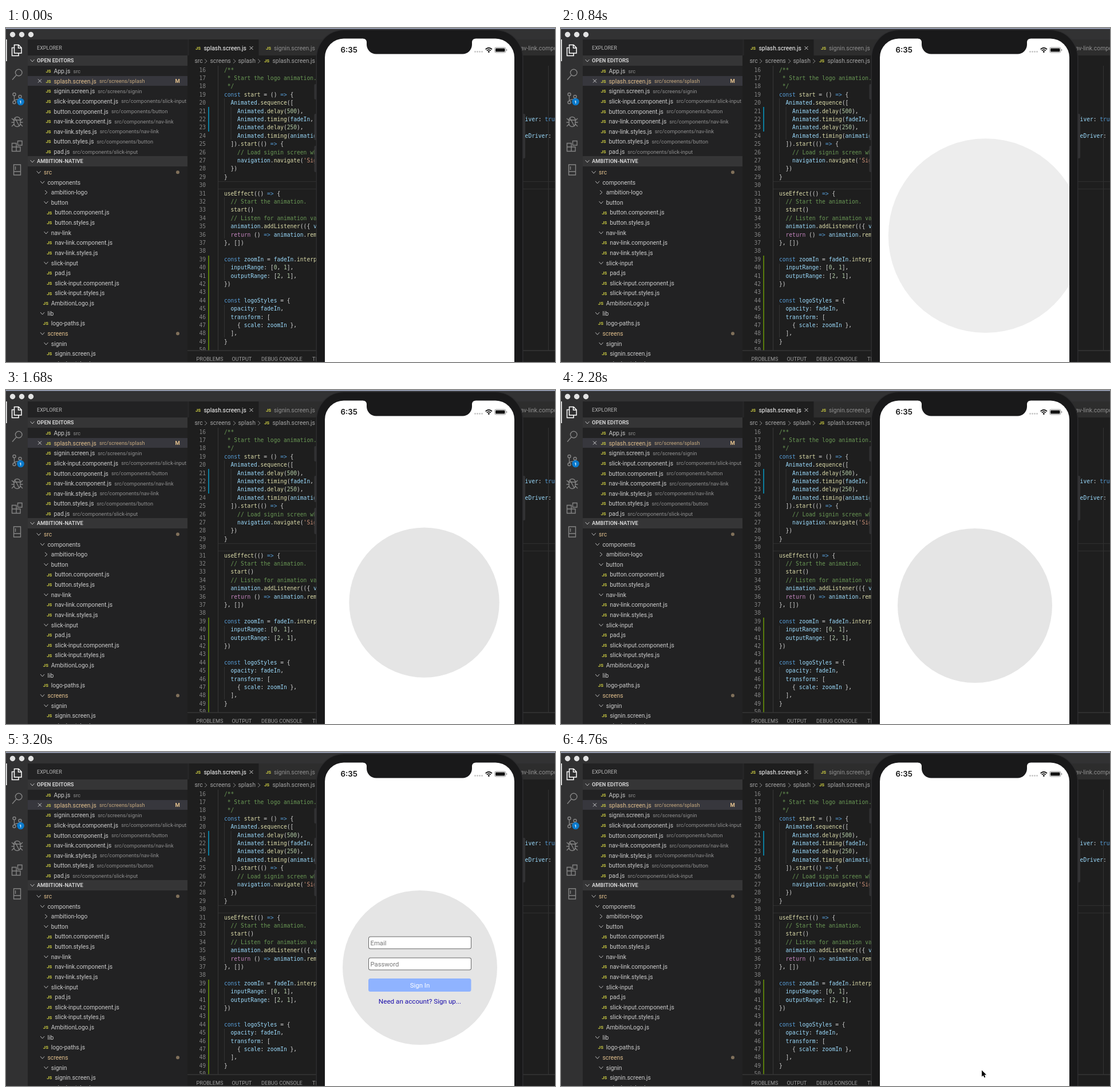
Recreate the animation shown at these times as an HTML page with a canvas. Size 959 px wide and 584 px high, loop 4800 ms.

```html
<!DOCTYPE html>
<html lang="en">
<head>
<meta charset="utf-8">
<style>
html, body { margin: 0; width: 100%; height: 100%; overflow: hidden; background: #1e1e1e; }
canvas { display: block; }
</style>
</head>
<body>
<canvas id="stage" width="959" height="584"></canvas>
<script>
const W = 959, H = 584, LOOP = 4800;
const stage = document.getElementById('stage').getContext('2d');
const desktop = document.createElement('canvas');
desktop.width = W;
desktop.height = H;
let g = desktop.getContext('2d');

const UI = 'Roboto, sans-serif', MONO = '"DejaVu Sans Mono", monospace';
const ORANGE = '#e2c08d', GREY = '#8f8f8f', BEZEL = '#19191a';

function rect(x, y, w, h, color) {
  g.fillStyle = color;
  g.fillRect(x, y, w, h);
}
function round(x, y, w, h, r, color) {
  g.fillStyle = color;
  g.beginPath();
  g.roundRect(x, y, w, h, r);
  g.fill();
}
function dot(x, y, r, color) {
  g.fillStyle = color;
  g.beginPath();
  g.arc(x, y, r, 0, 7);
  g.fill();
}
function line(path, color, width = 1) {
  g.strokeStyle = color;
  g.lineWidth = width;
  g.stroke(new Path2D(path));
}
// y is the middle of the capitals; returns where the text ends
function text(str, x, y, color, size = 10.35, weight = 400, family = UI, align = 'left') {
  g.font = `${weight} ${size}px ${family}`;
  g.fillStyle = color;
  g.textAlign = align;
  g.fillText(str, x, y + size * 0.36);
  return x + g.measureText(str).width;
}
const js = (x, y) => text('JS', x, y, '#cbcb41', 7.8, 700);
const cross = (x, y) => line(`M${x - 3} ${y - 3}l6 6m0-6l-6 6`, '#d0d0d0');
const chevron = (x, y, open, color = '#bbb') =>
  line(open ? `M${x - 3.5} ${y - 2}l3.5 4 3.5-4` : `M${x - 2} ${y - 3.5}l4 3.5-4 3.5`, color);

const openEditors = [
  'App.js src', 'splash.screen.js src/screens/splash', 'signin.screen.js src/screens/signin',
  'slick-input.component.js src/components/slick-input', 'button.component.js src/components/button',
  'nav-link.component.js src/components/nav-link', 'nav-link.styles.js src/components/nav-link',
  'button.styles.js src/components/button', 'pad.js src/components/slick-input'
];

// one leading space per level; + is an open folder, > a closed one
const tree = `+src
 +components
  >ambition-logo
  +button
   button.component.js
   button.styles.js
  +nav-link
   nav-link.component.js
   nav-link.styles.js
  +slick-input
   pad.js
   slick-input.component.js
   slick-input.styles.js
  AmbitionLogo.js
 +lib
  logo-paths.js
 +screens
  +signin
   signin.screen.js
   signin.styles.js`.split('\n');

const code = `/**
 * Start the logo animation.
 */
const start = () => {
  Animated.sequence([
    Animated.delay(500),
    Animated.timing(fadeIn, { toValue: 1, duration: 750, easing: Easing.linear, useNativeDriver: true }),
    Animated.delay(250),
    Animated.timing(animation, { toValue: 1, duration: 750, easing: Easing.linear, useNativeDriver: true })
  ]).start(() => {
    // Load signin screen when done.
    navigation.navigate('SignIn')
  })
}

useEffect(() => {
  // Start the animation.
  start()
  // Listen for animation values.
  animation.addListener(({ value }) => {})
  return () => animation.removeAllListeners()
}, [])

const zoomIn = fadeIn.interpolate({
  inputRange: [0, 1],
  outputRange: [2, 1],
})

const logoStyles = {
  opacity: fadeIn,
  transform: [
    { scale: zoomIn },
  ],
}
`.split('\n');

const TOKEN = /^ ?\/?\*.*|\/\/.*|'[^']*'|=>|\w+|\s+|[^\w\s]/g;
function tokenColor(token, rest) {
  if (/^( ?\/?\*|\/\/)/.test(token)) return '#6a9955';
  if (token[0] === "'") return '#ce9178';
  if (/^(const|=>|true)$/.test(token)) return '#569cd6';
  if (token === 'return') return '#c586c0';
  if (/^\d/.test(token)) return '#b5cea8';
  if (token === 'start' || (/^\w/.test(token) && rest[0] === '(')) return '#dcdcaa';
  return /^\w/.test(token) ? '#9cdcfe' : '#d4d4d4';
}

function drawActivityBar() {
  rect(0, 20, 38, H, '#313132');
  rect(0, 20, 1.5, 38, '#fff');
  line('M14.5 29.5h7.5l5 5v9.5h-12.5zM21.5 30v5h5M14 34.5h-3.5v14h11.5V44', '#fff', 1.5);
  const c = '#858585';
  line('M28 78a5.8 5.8 0 1 1-11.6 0a5.8 5.8 0 1 1 11.6 0M18 82.5l-7 8', c, 1.4);
  line('M17 116a2.5 2.5 0 1 1-5 0a2.5 2.5 0 1 1 5 0M27 120a2.5 2.5 0 1 1-5 0a2.5 2.5 0 1 1 5 0' +
    'M17 130a2.5 2.5 0 1 1-5 0a2.5 2.5 0 1 1 5 0M14.5 118.5v9M24.5 122.5c0 4-10 1-10 5', c, 1.4);
  dot(25.5, 129, 6.3, '#0a7acc');
  text('1', 25.5, 129, '#fff', 7.5, 700, UI, 'center');
  line('M14 161a5.5 5.5 0 0 1 11 0v6a5.5 5.5 0 0 1-11 0zM14 161h11M14 162l-4-4m4 7h-4.5M14 168l-4 4' +
    'M25 162l4-4m-4 7h4.5M25 168l4 4M15.5 157l8 15', c, 1.4);
  line('M10.5 201.5h7.5v14h-7.5zM10.5 208h14.5v7.5h-7M20.5 197.5h7.5v7.5h-7.5z', c, 1.4);
  line('M13.5 239h12v18h-12zM13.5 251h12M16.5 242v6', c, 1.4);
}

function drawSidebar() {
  rect(38, 20, 279, H, '#222223');
  text('EXPLORER', 54, 35, '#b5b5b5', 9.1);
  for (const [label, y] of [['OPEN EDITORS', 57], ['AMBITION-NATIVE', 233]]) {
    rect(38, y - 9, 279, 18, '#353536');
    chevron(46, y, true);
    text(label, 54, y, '#d0d0d0', 9.4, 700);
  }
  rect(38, 84, 279, 17, '#37373d');
  cross(59, 92.5);
  text('M', 295.5, 92.5, ORANGE, 9.5, 700);
  openEditors.forEach((entry, i) => {
    const y = 75.3 + i * 17.62, [name, path] = entry.split(' ');
    const active = i === 1;
    js(69.5, y);
    const end = text(name, 83.5, y, active ? ORANGE : '#cccccc');
    text(path, end + 5, y, active ? '#c2a67d' : GREY, 9.25);
  });
  tree.forEach((entry, i) => {
    const y = 252.2 + i * 17.63, depth = entry.search(/\S/), x = 66 + depth * 6.4;
    const kind = entry[depth], folder = kind === '+' || kind === '>';
    const name = entry.slice(depth + (folder ? 1 : 0));
    const changed = name === 'src' || name === 'screens';
    if (folder) chevron(x - 8.8, y, kind === '+'); else js(x - 14, y);
    if (changed) dot(300, y, 3, '#80705a');
    text(name, x, y, changed ? ORANGE : '#cccccc');
  });
}

function drawEditor() {
  rect(317, 20, W, H, '#1e1e1e');
  rect(317, 20, W, 28, '#252526');
  rect(320, 20, 121, 28, '#1e1e1e');
  rect(442, 20, 115, 28, '#2d2d2d');
  rect(890, 20, 69, 28, '#2d2d2d');
  js(331, 35);
  text('splash.screen.js', 345.5, 35, '#fff');
  cross(428.5, 35);
  js(454, 35);
  text('signin.screen.js', 468, 35, GREY);
  text('nav-link.component.js', 893, 35, GREY);

  [['src', 329.5], ['screens', 356.5], ['splash', 405.5]].forEach(([name, x]) => text(name, x, 57.5, '#a5a5a5'));
  [349, 399, 442].forEach(x => chevron(x, 58, false, '#888'));
  js(451, 57.5);
  text('splash.screen.js', 465.5, 57.5, '#a5a5a5');

  g.save();
  g.beginPath();
  g.rect(317, 66, W, 497.5);
  g.clip();
  rect(370, 66, 1, 498, '#383838');
  rect(381, 123, 1, 130, '#343434');
  rect(392.5, 138, 1, 57, '#343434');
  rect(381, 296, 1, 72, '#343434');
  rect(381, 412, 1, 29, '#343434');
  rect(381, 484, 1, 57, '#343434');
  rect(947, 66, 1, 498, '#343434');
  rect(371, 268, W, 1, '#303030');
  rect(371, 281, W, 1, '#303030');
  rect(353, 138, 2, 43, '#0c7d9d');
  rect(353, 398, 2, 166, '#587c0c');
  code.forEach((row, i) => {
    const y = 73.2 + i * 14.4;
    text(16 + i, 349, y, '#858585', 9.6, 400, MONO, 'right');
    let x = 381, at = 0;
    for (const token of row.match(TOKEN) || []) {
      at += token.length;
      x = text(token, x, y, tokenColor(token, row.slice(at)), 9.6, 400, MONO);
    }
  });
  g.restore();

  rect(317, 563.5, W, 1, '#414141');
  [['PROBLEMS', 332.5], ['OUTPUT', 394.5], ['DEBUG CONSOLE', 446], ['TERMINAL', 535]]
    .forEach(([label, x]) => text(label, x, 579, '#a0a0a0', 9.15));
}

function drawPhone() {
  [[538.5, 98, 27], [538.5, 150, 46], [538.5, 206, 46], [902, 150, 78]]
    .forEach(([x, y, h]) => round(x, y, 5, h, 2, '#323234'));
  round(541.5, 2.5, 362, 640, 49, '#2c2c2e');
  round(543, 4, 359, 640, 47.5, BEZEL);
  round(557, 18.5, 331, 640, 33, '#fff');
  g.fillStyle = BEZEL;
  g.fill(new Path2D('M624 18v.5a6 6 0 0 1 6 6v4.5a16.5 16.5 0 0 0 16.5 16.5h151a16.5 16.5 0 0 0 16.5-16.5' +
    'v-4.5a6 6 0 0 1 6-6v-.5z'));
  text('6:35', 584.5, 38.5, '#111', 13.3, 600, 'Inter, sans-serif');
  for (let i = 0; i < 4; i++) dot(819.5 + i * 4, 41.5, 1.4, '#c4c4c4');
  line('M837.7 37.2q5.6-4.8 11.2 0M839.8 39.6q3.5-3 7 0', '#111', 1.8);
  dot(843.3, 41.6, 1.5, '#111');
  g.strokeStyle = '#999';
  g.lineWidth = 1;
  g.beginPath();
  g.roundRect(853.5, 34, 19.5, 9, 2.5);
  g.stroke();
  round(855, 35.5, 16.5, 6, 1.3, '#111');
  rect(874, 37, 1.2, 3, '#999');
}

function drawDesktop() {
  rect(0, 0, W, 20, '#323233');
  rect(0, 0, W, 1.5, '#a9b2cb');
  [11.5, 27.5, 43.5].forEach(x => dot(x, 11.5, 4.7, '#e3e3e3'));
  drawActivityBar();
  drawSidebar();
  drawEditor();
  drawPhone();
}

const progress = (t, from, to) => Math.min(1, Math.max(0, (t - from) / (to - from)));
const ease = p => p * p * (3 - 2 * p);
const mix = (a, b, p) => a + (b - a) * p;

const RELOAD = 4180;

// The logo stands as a plain disc: fade and zoom, then a shift to its second form
function drawLogo(t) {
  const fade = progress(t, 336, 1086), form = progress(t, 1336, 2086);
  const scale = 2 - fade;
  g.save();
  g.beginPath();
  g.rect(557, 46, 331, H);
  g.clip();
  g.globalAlpha = fade;
  g.translate(723, 379);
  g.scale(scale, scale);
  dot(mix(14, 0, form), mix(-12, -2, form), mix(128, 135, form), '#e5e5e5');
  g.restore();
}

function drawForm(t) {
  g.save();
  g.globalAlpha = progress(t, 2300, 2600);
  for (const [label, y] of [['Email', 322.5], ['Password', 359.5]]) {
    round(633, y, 180, 22, 3.5, '#666');
    round(634, y + 1, 178, 20, 2.5, '#fff');
    text(label, 636.5, y + 11, '#777', 11.3);
  }
  round(633, 396, 179.5, 23, 3.5, '#8fb3ff');
  text('Sign In', 723, 407.7, '#fff', 11.4, 400, UI, 'center');
  text('Need an account? Sign up...', 723, 435.7, '#1a0dab', 11.7, 400, UI, 'center');
  g.restore();
}

function drawPointer(t) {
  if (t < 3400) return;
  const up = ease(progress(t, 3400, 3850)), down = ease(progress(t, 4240, 4700));
  g.save();
  g.translate(mix(mix(742, 729, up), 735, down), mix(mix(590, 411.5, up), 556.5, down));
  const arrow = 'M0 0v11.2l2.6-2.4 1.8 4 1.9-.8-1.8-4h3.6z';
  line(arrow, '#fff', 1.8);
  g.fillStyle = '#000';
  g.fill(new Path2D(arrow));
  g.restore();
}

drawDesktop();
g = stage;

function frame(now) {
  const t = now % LOOP;
  g.drawImage(desktop, 0, 0);
  if (t < RELOAD) {
    drawLogo(t);
    drawForm(t);
  }
  drawPointer(t);
  requestAnimationFrame(frame);
}
requestAnimationFrame(frame);
</script>
</body>
</html>
```
